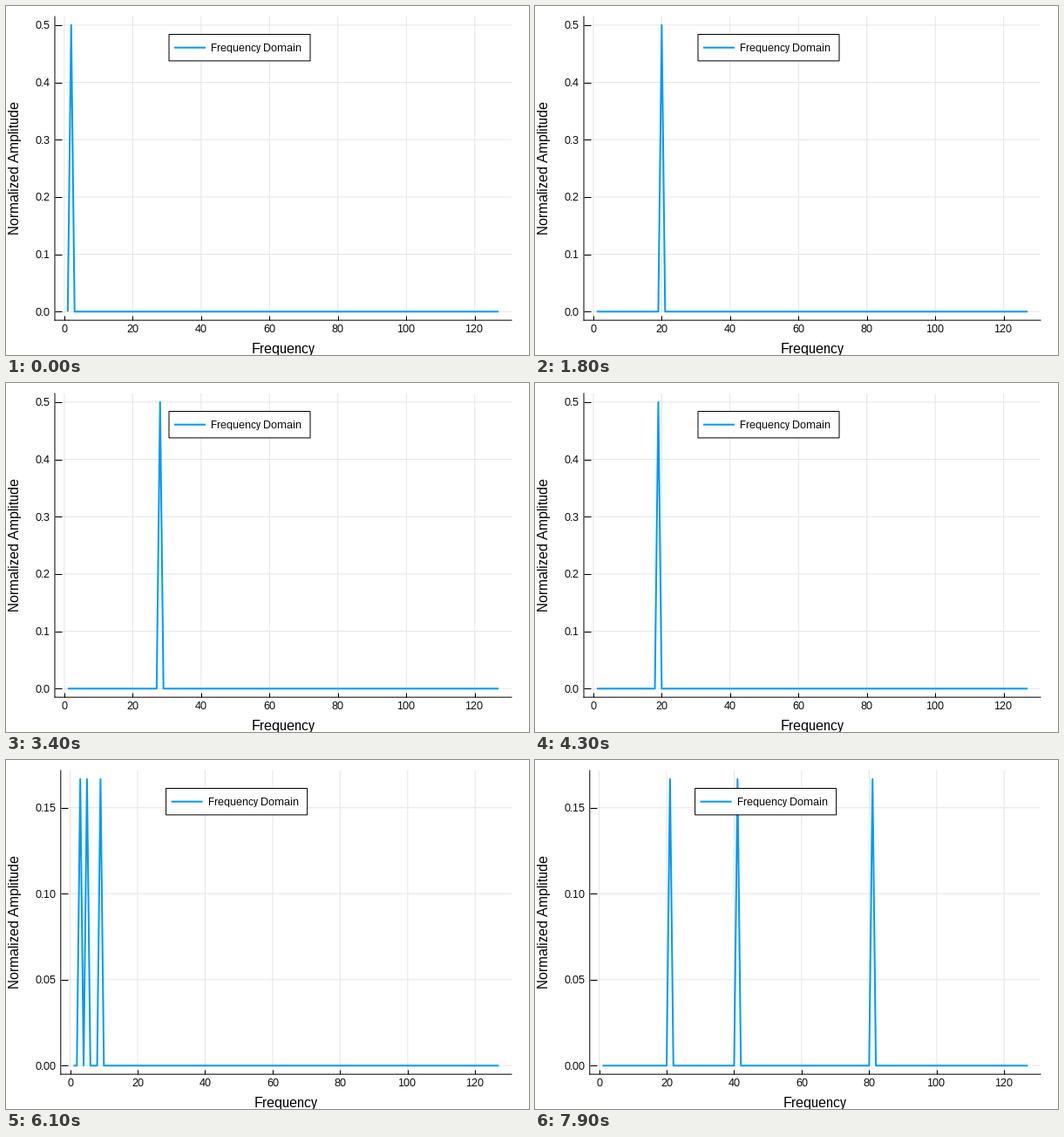
A matplotlib script that plays this animation: 600 px wide and 400 px high, repeating every 8000 ms.

```python
import numpy as np
import matplotlib.pyplot as plt
from matplotlib.animation import FuncAnimation
from matplotlib.patches import Rectangle
from matplotlib.transforms import Affine2D

W, H, DPI = 600, 400, 100
PX = 72 / DPI  # points per pixel
TOP, BOTTOM, RIGHT = 12, 360.15, 580
SMALL, LARGE = 11.73, 16.13  # text sizes in pixels
BLUE = "#009afa"
FRAMES, SINGLE_FRAMES = 80, 60

plt.rcParams.update({
    "font.family": "Liberation Sans",
    "text.hinting": "native",
    "text.hinting_factor": 1,  # whole-pixel glyph advances
    "text.kerning_factor": 6,
    "axes.linewidth": PX,
    "axes.axisbelow": True,
})

fig = plt.figure(figsize=(W / DPI, H / DPI), dpi=DPI, facecolor="white")
pixels = Affine2D().scale(1 / W, -1 / H).translate(0, 1) + fig.transFigure
bins = np.arange(1, 128)


def padded(lo, hi):
    pad = 0.03 * (hi - lo)
    return lo - pad, hi + pad


def style_axes(ax, yticks, fmt):
    ax.spines[["top", "right"]].set_visible(False)
    ax.grid(color="#e6e6e6", linewidth=PX)
    ax.set_xticks(range(0, 121, 20))
    ax.set_yticks(yticks, [fmt % v for v in yticks])
    ax.tick_params(direction="in", width=PX, labelsize=SMALL * PX)
    ax.tick_params(axis="x", length=5.2 * PX, pad=14 * PX)
    ax.tick_params(axis="y", length=7.9 * PX, pad=5 * PX)
    for label in ax.get_xticklabels():
        label.set_va("baseline")
    for spine in ax.spines.values():
        spine.set_snap(False)
    for axis in (ax.xaxis, ax.yaxis):
        for line in axis.get_gridlines() + axis.get_ticklines():
            line.set_snap(False)


def make_plot(left, peak, yticks, fmt, legend_x):
    """Build one spectrum plot; return its axes and curve."""
    ax = fig.add_axes([left / W, 1 - BOTTOM / H,
                       (RIGHT - left) / W, (BOTTOM - TOP) / H])
    ax.set_xlim(*padded(1, 127))
    ax.set_ylim(*padded(0, peak))
    style_axes(ax, yticks, fmt)

    def text(x, y, s, size, **kw):
        ax.text(x, y, s, fontsize=size * PX, transform=pixels,
                va="baseline", rotation_mode="anchor", zorder=6, **kw)

    def line(x, y, **kw):
        return ax.plot(x, y, color=BLUE, linewidth=2 * PX,
                       solid_capstyle="butt", solid_joinstyle="round",
                       scalex=False, scaley=False, **kw)[0]

    text((left + RIGHT) / 2, 398, "Frequency", LARGE, ha="center")
    text(14.6, 185.5, "Normalized Amplitude", LARGE, ha="center", rotation=90)

    ax.add_patch(Rectangle((legend_x, 32.5), 162, 30.4, transform=pixels,
                           facecolor="white", edgecolor="black", snap=False,
                           linewidth=PX, zorder=4, clip_on=False))
    line([legend_x + 6, legend_x + 42], [47.7, 47.7], transform=pixels,
         snap=False, zorder=5, clip_on=False)
    text(legend_x + 48.4, 52, "Frequency Domain", SMALL)
    return ax, line(bins, 0 * bins, zorder=3)


one, one_curve = make_plot(56, 1 / 2, np.arange(6) / 10, "%.1f", 187)
three, three_curve = make_plot(62.8, 1 / 6, np.arange(4) / 20, "%.2f", 183.6)


def update(i):
    single = i < SINGLE_FRAMES
    one.set_visible(single)
    three.set_visible(not single)
    if single:
        # the tone sweeps up to 31 and back down
        tone = 31 - abs(i - 30)
        one_curve.set_ydata(np.where(bins == tone + 1, 1 / 2, 0))
    else:
        tone = i - SINGLE_FRAMES + 1
        peaks = [tone + 1, 2 * tone + 1, 4 * tone + 1]
        three_curve.set_ydata(np.where(np.isin(bins, peaks), 1 / 6, 0))
    return one_curve, three_curve


anim = FuncAnimation(fig, update, frames=FRAMES, interval=100,
                     repeat=True, repeat_delay=0, blit=False)
plt.show()
```
